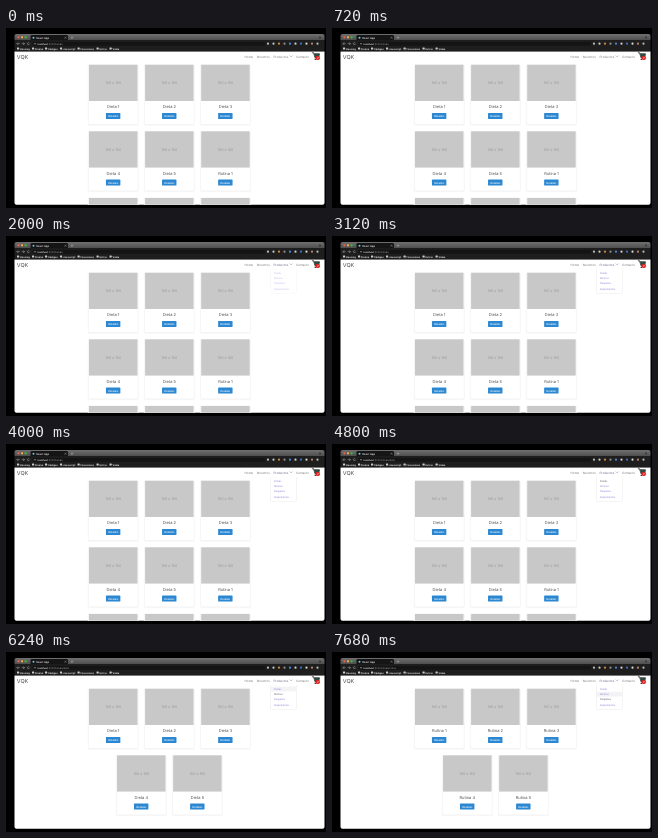
An HTML page for the animation above (8 s loop, 320 by 180 pixels).

```html
<!DOCTYPE html>
<html lang="es">
<head>
<meta charset="utf-8">
<title>React App</title>
<style>
html, body { margin: 0; width: 100%; height: 100%; overflow: hidden; background: #000; }
svg { display: block; width: 100vw; height: 100vh; }
text { font-family: Inter, Roboto, sans-serif; text-rendering: geometricPrecision; }
</style>
</head>
<body>
<svg id="stage" viewBox="0 0 320 180" xmlns="http://www.w3.org/2000/svg">
  <defs>
    <clipPath id="win"><rect x="8.5" y="6" width="310" height="170.8" rx="2"/></clipPath>
    <linearGradient id="strip" x2="0" y2="1">
      <stop stop-color="#707070"/><stop offset="1" stop-color="#4c4c4c"/>
    </linearGradient>
  </defs>
  <g id="app" clip-path="url(#win)"></g>
</svg>
<script>
const NS = 'http://www.w3.org/2000/svg';
const LOOP = 8000;
const app = document.getElementById('app');

function add(parent, tag, attrs, content) {
  const node = document.createElementNS(NS, tag);
  for (const key in attrs) node.setAttribute(key, attrs[key]);
  if (content !== undefined) node.textContent = content;
  parent.appendChild(node);
  return node;
}
const rect = (p, x, y, width, height, fill, more) =>
  add(p, 'rect', { x, y, width, height, fill, ...more });
const dot = (p, cx, cy, r, fill) => add(p, 'circle', { cx, cy, r, fill });
const line = (p, d, stroke, w) =>
  add(p, 'path', { d, stroke, 'stroke-width': w, fill: 'none', 'stroke-linecap': 'round' });
const label = (p, x, y, size, fill, content, more) =>
  add(p, 'text', { x, y, 'font-size': size, fill, ...more }, content);
const group = p => add(p, 'g', {});
const show = (node, on) => node.setAttribute('visibility', on ? 'visible' : 'hidden');
const ramp = (t, from, to) => Math.min(1, Math.max(0, (t - from) / (to - from)));

// Browser frame
rect(app, 8, 6, 311, 6.4, 'url(#strip)');
rect(app, 24.5, 7, 37.5, 6, '#151515', { rx: 1.2 });
rect(app, 8, 12.2, 311, 12, '#1e1e1e');
['#fb5f57', '#fdbc2e', '#29c840'].forEach((c, i) => dot(app, 12.4 + i * 3.6, 9.3, 1.1, c));
dot(app, 27.5, 9.7, 1, '#61c9e8');
label(app, 30.3, 10.6, 2.6, '#eee', 'React App', { 'font-weight': 500 });
line(app, 'M58.8 9l1.4 1.4m0-1.4l-1.4 1.4M65 9.7h2m-1-1v2', '#ddd', .3);
dot(app, 314, 9.5, 1, '#333');
line(app, 'M13.4 15.7h-2.4m1-1l-1 1l1 1M16 15.7h2.4m-1-1l1 1l-1 1', '#ccc', .4);
line(app, 'M23.2 14.9a1.1 1.1 0 1 0 .2 1.3', '#ccc', .4);
rect(app, 26.5, 13.7, 233, 4, '#141414', { rx: 2 });
dot(app, 29, 15.7, .7, '#aaa');
const url = label(app, 31.6, 16.6, 2.4, '#fff', '', { 'font-family': 'Roboto, sans-serif' });
add(url, 'tspan', { 'font-weight': 500 }, 'localhost');
const path = add(url, 'tspan', { fill: '#999' }, '');
['#b9b9b9', '#c9c9c9', '#d4863b', '#8d8d8d', '#4f86d8', '#cfcfcf', '#3f6fb5', '#d9d9d9', '#b98262', '#bbb']
  .forEach((c, i) => dot(app, 262 + i * 5.5, 15.7, 1.1, c));

const marks = ['Housing', 'Diseño', 'Códigos', 'Javascript', 'Financieros', 'Extras', 'Video'];
[11, 26, 39, 54, 71.5, 90.5, 103.5].forEach((x, i) => {
  rect(app, x, 19.6, 2.2, 1.9, '#ccc', { rx: .3 });
  label(app, x + 3, 21.5, 2.45, '#f0f0f0', marks[i], { 'font-weight': 600 });
});

// Page header
rect(app, 8, 23.6, 311, 154, '#fff');
label(app, 10.8, 30.6, 5.5, '#555', 'VQK');
const navText = (x, word) => label(app, x, 29.5, 3.05, '#777', word);
navText(238.6, 'Home');
navText(250.8, 'Nosotros');
const products = navText(267.6, 'Productos');
const chevron = line(app, 'M284 27.8l1.1 1.1l1.1-1.1', '#777', .45);
navText(290, 'Contacto');
line(app, 'M306.3 24.8h1.4l1.2 4.8h3.6l1-3.6h-5.4', '#222', .8);
add(app, 'path', { d: 'M308.2 25.6h5.4l-1 3.6h-3.6z', fill: '#2f4a40' });
dot(app, 309.3, 31.2, .8, '#222');
dot(app, 311.8, 29.9, 2.2, '#d92323');
label(app, 311.8, 30.9, 2.7, '#fff', '2', { 'text-anchor': 'middle' });

// Product cards
function card(parent, x, y, title) {
  const mid = { 'text-anchor': 'middle' };
  const g = group(parent), cx = x + 24.25;
  rect(g, x - 1.4, y, 51.3, 61, '#fafafa', { rx: 1.4 });
  rect(g, x - .8, y, 50.1, 60.2, '#f3f3f3', { rx: 1 });
  rect(g, x - .2, y - .3, 48.9, 59.6, '#fff', { rx: .6 });
  rect(g, x, y, 48.5, 36.3, '#c8c8c8');
  label(g, cx, y + 19.2, 3.6, '#969696', '150 x 150', mid);
  const head = label(g, cx, y + 43.6, 4, '#505050', title, mid);
  rect(g, cx - 7.3, y + 48.3, 14.4, 6, '#2b87d1', { rx: .6 });
  label(g, cx, y + 52.3, 2.65, '#fff', 'Detalles', { ...mid, 'font-weight': 500 });
  return head;
}
const COL = 56.1, ROW = 66.6, LEFT = 83, TOP = 36.7;
const all = group(app), filtered = group(app);
['Dieta 1', 'Dieta 2', 'Dieta 3', 'Dieta 4', 'Dieta 5', 'Rutina 1', 'Rutina 2', 'Rutina 3', 'Rutina 4']
  .forEach((name, i) => card(all, LEFT + i % 3 * COL, TOP + Math.floor(i / 3) * ROW, name));
const heads = [0, 1, 2, 3, 4].map(i => i < 3
  ? card(filtered, LEFT + i * COL, TOP, '')
  : card(filtered, LEFT + (i - 2.5) * COL, TOP + ROW, ''));

// Dropdown
const STEP = 5.2;
const menu = group(app);
rect(menu, 264.1, 33, 26.6, 24.6, '#ececec', { rx: .8 });
rect(menu, 264.6, 33, 25.6, 24, '#fff', { rx: .6 });
const band = rect(menu, 264.6, 34.6, 25.6, 4.8, '#f3f3f5');
const items = ['Dietas', 'Rutinas', 'Paquetes', 'Suplementos']
  .map((word, i) => label(menu, 268, 37.9 + i * STEP, 2.5, '#8a84dc', word));

function draw(t) {
  const open = ramp(t, 1840, 2160);
  menu.setAttribute('opacity', open);
  products.setAttribute('fill', open > .5 ? '#67648a' : '#777');
  chevron.setAttribute('stroke', open > .5 ? '#7772d2' : '#777');

  const hover = t < 4240 ? -1 : t < 5920 ? 0 : t < 7600 ? 1 : 2;
  items.forEach((item, i) => item.setAttribute('fill', i === hover ? '#5c5b70' : '#8a84dc'));

  // The last chosen entry keeps its highlight once the pointer moves on
  show(band, hover > 0);
  band.setAttribute('y', 34.6 + Math.max(0, hover - 1) * STEP);

  const kind = t < 6640 ? 'Dieta' : 'Rutina';
  path.textContent = ':3000/tienda' + (t < 4720 ? '' : '/' + kind.toLowerCase());
  heads.forEach((head, i) => { head.textContent = kind + ' ' + (i + 1); });
  show(all, t < 4880);
  show(filtered, t >= 4880);
}

const start = performance.now();
function tick() {
  draw((performance.now() - start) % LOOP);
  requestAnimationFrame(tick);
}
tick();
</script>
</body>
</html>
```
